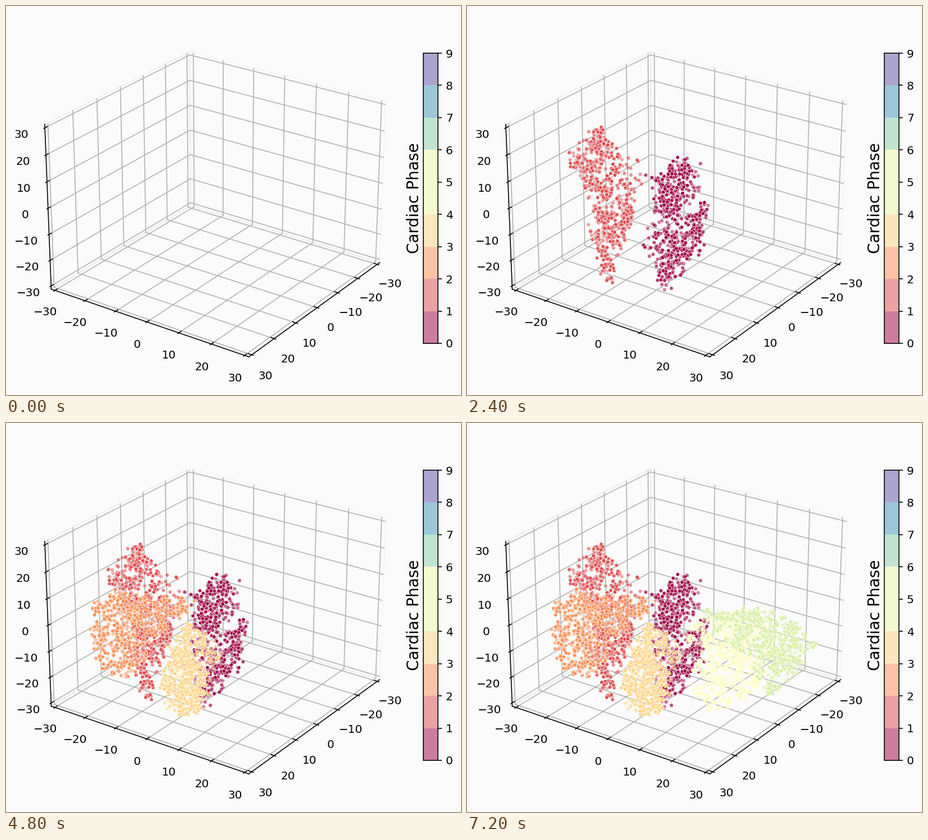
These frames come from a looping animation (809 px wide and 693 px high, 8 s). A matplotlib script:

```python
import numpy as np
import matplotlib.pyplot as plt
from matplotlib.animation import FuncAnimation
from matplotlib.collections import LineCollection
from matplotlib.patches import Polygon, Rectangle

W, H, DPI = 809, 693, 128
PX = 72 / DPI                       # points per pixel
LIM, TICKS = 31.25, range(-30, 31, 10)
ELEV, AZIM = np.radians([25, 35])
SCALE, CENTER, DIST = 3588, (376.2, 338), 10
UNIT = np.array([4, 4, 3]) * 1.19048 / 4 / (2 * LIM)
SPECTRAL = plt.get_cmap("Spectral")

plt.rcParams["font.family"] = "DejaVu Sans"
fig = plt.figure(figsize=(W / DPI, H / DPI), dpi=DPI, facecolor="#fbfbfb")
ax = fig.add_axes([0, 0, 1, 1])
ax.set_xlim(0, W)
ax.set_ylim(H, 0)
ax.axis("off")


def project(point):
    """Perspective view of a data point, in pixels."""
    p = np.asarray(point) * UNIT
    ce, se, ca, sa = np.cos(ELEV), np.sin(ELEV), np.cos(AZIM), np.sin(AZIM)
    depth = DIST - p @ [ce * ca, ce * sa, se]
    right = p @ [-sa, ca, 0]
    up = p @ [-se * ca, -se * sa, ce]
    return CENTER[0] + SCALE * right / depth, CENTER[1] - SCALE * up / depth


def lines(paths, color, z, **kw):
    segs = [[project(p) for p in path] for path in paths]
    ax.add_collection(LineCollection(segs, colors=color, linewidths=1.6 * PX,
                                     zorder=z, **kw), autolim=False)


def label(x, y, value, **kw):
    ax.text(x, y, str(value).replace("-", "\u2212"), fontsize=20 * PX, **kw)


def turn(values, axis):
    """Place (along the axis, next, after next) values into x, y, z order."""
    return np.roll(values, axis)


def draw_box():
    a, b = -LIM, LIM
    for axis, grey in enumerate((0.95, 0.90, 0.925)):
        face = [turn((a, u, v), axis) for u, v in ((a, a), (b, a), (b, b), (a, b))]
        ax.add_patch(Polygon([project(c) for c in face], fill=False, alpha=0.5,
                             edgecolor=str(grey), lw=2 * PX, zorder=1))

    grid = [[turn((v, b, a), axis), turn((v, a, a), axis), turn((v, a, b), axis)]
            for axis in range(3) for v in TICKS]
    lines(grid, "#b0b0b0", 2)

    edges = [[(a, b, a), (b, b, a)], [(b, a, a), (b, b, a)], [(b, a, a), (b, a, b)]]
    lines(edges, "black", 3, capstyle="projecting")

    inner, outer, far = b - 1, b + 0.5, b + 4.15
    marks = []
    for v in TICKS:
        marks += [[(v, inner, a), (v, outer, a)],
                  [(inner, v, a), (outer, v, a)],
                  [(inner, a, v), (outer, a, v)]]
        for spot in [(v, far, -far), (far, v, -far), (far, -far, v)]:
            label(*project(spot), v, ha="center", va="top")
    lines(marks, "black", 3, capstyle="projecting")


def draw_colorbar():
    left, right, top, bottom = 742, 768, 84, 601
    step = (bottom - top) / 9
    for i in range(9):
        level = 4.5 if i in (4, 5) else i      # the two middle bands share a tone
        ax.add_patch(Rectangle((left, bottom - (i + 1) * step), right - left, step,
                               facecolor=SPECTRAL(level / 8), alpha=0.5, lw=0,
                               antialiased=False))
    ax.add_patch(Rectangle((left, top), right - left, bottom - top,
                           fill=False, edgecolor="black", lw=1.6 * PX))
    for i in range(10):
        y = bottom - i * step
        ax.plot([right, right + 7], [y, y], color="black", lw=1.6 * PX,
                solid_capstyle="butt")
        label(right + 14, y, i, ha="left", va="center_baseline")
    ax.text(734, 342.5, "Cardiac Phase", fontsize=28 * PX, rotation=90,
            rotation_mode="anchor", ha="center", va="baseline")


def sweep(spine, count, rng):
    """Random points in the area swept by a disc of changing radius."""
    keys = np.array(spine, float)
    s = np.linspace(0, len(keys) - 1, 300)
    x, y, r = (np.interp(s, np.arange(len(keys)), k) for k in keys.T)
    weight = r * np.hypot(np.gradient(x), np.gradient(y))
    pick = rng.choice(len(s), count, p=weight / weight.sum())
    angle = rng.uniform(0, 2 * np.pi, count)
    reach = r[pick] * rng.uniform(0, 1, count) ** 0.4
    return np.c_[x[pick] + reach * np.cos(angle), y[pick] + reach * np.sin(angle)]


# Each cloud follows a few discs: (x, y, radius)
SPINES = [
    [(400, 290, 20), (360, 304, 26), (378, 362, 56), (368, 420, 50),
     (357, 470, 25), (357, 506, 5)],
    [(236, 226, 9), (212, 262, 38), (262, 300, 52), (252, 370, 44),
     (250, 430, 28), (254, 484, 7)],
    [(340, 321, 4), (312, 326, 13), (250, 345, 38), (196, 344, 47),
     (202, 392, 55), (216, 442, 18)],
    [(336, 378, 14), (337, 418, 48), (312, 452, 34), (314, 475, 45), (330, 508, 13)],
    [(405, 368, 28), (520, 392, 42), (478, 440, 58), (436, 465, 42), (448, 508, 10)],
    [(440, 362, 26), (535, 368, 43), (572, 395, 49), (545, 440, 36), (540, 472, 12)],
]


def draw_cloud(i, spine):
    rng = np.random.default_rng(20 + i)
    count = 620
    spread = sweep(spine, count // 2, rng)
    seeds = spread[rng.integers(0, 60, count - len(spread))]
    pts = np.vstack([spread, seeds + rng.normal(0, 6, seeds.shape)])
    fade = np.sort(rng.uniform(0.4, 1, count))         # far points are fainter
    return ax.scatter(*pts.T, s=(6.6 * PX) ** 2, c=[SPECTRAL(i / 8)], alpha=fade,
                      edgecolors="white", linewidths=0.7 * PX, zorder=5 + i)


def update(frame):
    for i, cloud in enumerate(clouds):
        cloud.set_visible(frame >= 3 * (i + 1))
    return clouds


draw_box()
draw_colorbar()
clouds = [draw_cloud(i, spine) for i, spine in enumerate(SPINES)]
anim = FuncAnimation(fig, update, frames=20, interval=400, repeat=True,
                     repeat_delay=0, blit=False)
plt.show()
```
